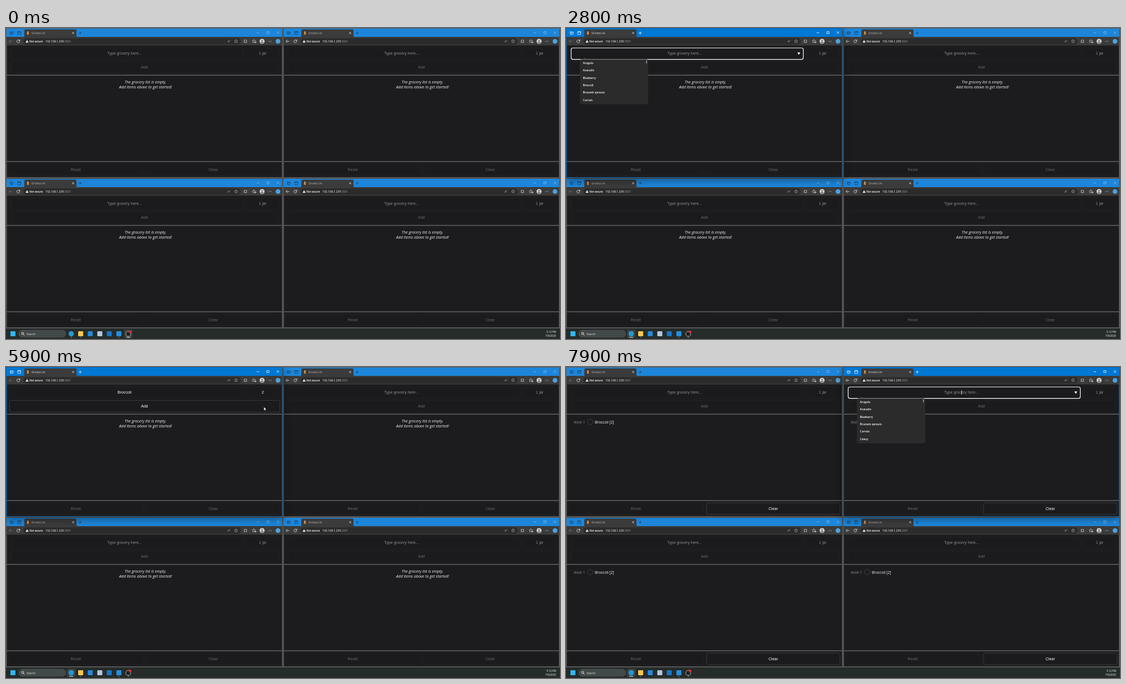
Write an HTML page that moves like this. It is 998 px wide and 561 px high and loops after 8 s.

```html
<!DOCTYPE html>
<html lang="en">
<head>
<meta charset="utf-8">
<title>Grocery List</title>
<style>
  html, body { margin: 0; width: 100%; height: 100%; overflow: hidden; background: #5c5c5c; }
  #stage { position: relative; width: 998px; height: 561px; overflow: hidden; }
  svg { display: block; position: absolute; left: 0; top: 0; }
  .window { position: absolute; width: 498px; height: 270px; box-shadow: 0 1px 5px rgba(0,0,0,.25); }
  .window.active { box-shadow: 0 4px 14px rgba(0,0,0,.42); }
  #overlay, #taskbar { z-index: 9; }
  text { white-space: pre; }
  .ui { font-family: "Open Sans", "Noto Sans", sans-serif; }
  .form { font: 7px "Liberation Sans", Arial, sans-serif; text-anchor: middle; }
  .line { fill: none; stroke-width: .8; stroke-linecap: round; stroke-linejoin: round; }
</style>
</head>
<body>
<div id="stage">
  <div class="window"></div>
  <div class="window"></div>
  <div class="window"></div>
  <div class="window"></div>
  <svg id="taskbar" width="998" height="561"></svg>
  <svg id="overlay" width="998" height="561"></svg>
</div>
<script>
const LOOP = 8000, STEP = 100;
const ORIGINS = [[0, 0], [499, 0], [0, 271], [499, 271]];
const ROW = 13.27;
const GROCERIES = ['Arugula', 'Avacado', 'Blueberry', 'Broccoli', 'Brussels sprouts', 'Carrots', 'Celery'];

const T = {
  activate: 1500, hover: 2000, focus: 2200, pick: 4500, quantity: 5300,
  typed: 5500, overAdd: 5700, added: 6200, blocked: 6500, hover2: 7400, focus2: 7700
};

// time, x, y
const POINTER = [
  [1000, 60, 235], [1400, 160, 175], [1700, 190.5, 153], [1800, 194, 138], [1900, 206, 84], [2000, 213, 46],
  [3500, 213, 46], [3600, 206, 60], [3800, 150, 78], [4100, 84, 97], [4300, 72.5, 101], [4500, 72.5, 101],
  [4600, 160, 74], [4700, 300, 50], [5000, 330, 46], [5100, 462, 46], [5600, 462, 46], [5700, 464, 62],
  [5900, 464.5, 72], [6200, 258, 72], [6800, 258, 72], [7200, 490.5, 72], [7300, 620, 60], [7400, 712, 46], [8000, 712, 46]
];

const between = (t, from, to) => t >= from && t < to;

function pointerAt(t) {
  if (t < POINTER[0][0]) return null;
  const i = POINTER.findIndex(p => p[0] > t);
  const [t0, x0, y0] = POINTER[i - 1], [t1, x1, y1] = POINTER[i];
  const k = (t - t0) / (t1 - t0);
  return { x: x0 + (x1 - x0) * k, y: y0 + (y1 - y0) * k };
}

const rect = (x, y, w, h, fill, r = 0, more = '') =>
  `<rect x="${x}" y="${y}" width="${w}" height="${h}" rx="${r}" fill="${fill}" ${more}/>`;
const circle = (x, y, r, fill, more = '') => `<circle cx="${x}" cy="${y}" r="${r}" fill="${fill}" ${more}/>`;
const line = (d, stroke, more = '') => `<path class="line" d="${d}" stroke="${stroke}" ${more}/>`;
const label = (x, y, size, fill, str, more = '') =>
  `<text class="ui" x="${x}" y="${y}" font-size="${size}" fill="${fill}" ${more}>${str}</text>`;
const formText = (x, y, fill, str) => `<text class="form" x="${x}" y="${y}" fill="${fill}">${str}</text>`;
const box = (x, y, w, h, stroke, width = .7) =>
  rect(x, y, w, h, '#1b1b1d', 3, `stroke="${stroke}" stroke-width="${width}"`);

function titleBar(active) {
  const ink = active ? '#fff' : 'rgba(255,255,255,.45)';
  const icon = active ? '#eaf4ff' : '#123f68';
  return rect(1, 1, 496.5, 17, active ? '#0078d4' : '#1d86da') +
    line('M8 7h4a1 1 0 0 1 1 1v1M7.5 7v3a1.5 1.5 0 0 0 1.5 1.5', icon) +
    circle(11, 9.8, 1.9, 'none', `stroke="${icon}" stroke-width=".8"`) +
    line('M21.5 6.5h5v5h-5zM21.5 7.3h5', icon) +
    `<path d="M30 17q3 0 3-3V5q0-2.500 2.500-2.500H124.500Q127 2.500 127 5V14q0 3 3 3z" fill="#3b3b3b"/>` +
    rect(37.8, 8, 3.4, 4, '#d9822b', .8) + circle(39.3, 7.2, 1.2, '#b9b9b9') +
    label(46, 10.7, 4.4, active ? '#eee' : '#c4c4c4', 'Grocery List') +
    line('M119.500 7.500l3 3m0-3l-3 3', '#ddd', 'stroke-width=".6"') +
    line('M131.500 9h4.400M133.700 6.800v4.400', active ? '#fff' : '#123f68') +
    line('M452 8.500h3.500M470.200 6.500h3.600v3.600h-3.600zM488 6.500l3.600 3.600m0-3.600l-3.600 3.600', ink);
}

function toolBar(canGoBack) {
  const ink = '#dedede';
  return rect(1, 16, 496.5, 18, '#3b3b3b') +
    line('M11 24H5.500m2.300-2.300L5.500 24l2.300 2.300', canGoBack ? ink : '#707070') +
    line('M24.700 23a2.700 2.700 0 1 0 .1 1.800M25 21v2.200h-2.200', ink) +
    rect(31.5, 18.3, 391.5, 11.4, '#2b2b2b', 5.7) +
    `<path d="M38 21.300l2.700 4.900h-5.400z" fill="#fff"/>` + line('M38 23v1.400', '#2b2b2b', 'style="stroke-width:.6"') +
    label(42.3, 25.7, 4.6, '#fff', 'Not secure', 'font-weight="600"') +
    label(71, 25.8, 5.1, '#fff', '192.168.1.239<tspan fill="#a5a5a5">:3001</tspan>') +
    label(399.3, 26, 5.2, '#bbb', 'A') + line('M403.500 21.500q1 1 0 2', '#bbb', 'style="stroke-width:.5"') +
    star(414.5, 24, '#bbb') +
    line('M429.500 22h1.300q.7-1.400 1.400 0h1.300v1.300q-1.400.700 0 1.400v1.300h-4z', ink) +
    star(446.5, 24, ink) + line('M448.500 25h2M448.500 26.500h2', ink) +
    circle(461.3, 24, 4.5, '#d6d6d6') + circle(461.3, 22.7, 1.5, '#777') +
    `<path d="M458.400 26.800q0-2 2.900-2t2.900 2q-2.900 2-5.800 0" fill="#777"/>` +
    [473.2, 475.4, 477.6].map(x => circle(x, 24, .6, ink)).join('') +
    circle(490, 24, 4.3, '#4f9fdc');
}

function star(cx, cy, stroke) {
  const points = Array.from({ length: 10 }, (_, i) => {
    const r = i % 2 ? 1.5 : 3.2, a = (i / 5 - .5) * Math.PI;
    return `${(cx + r * Math.cos(a)).toFixed(2)} ${(cy + r * Math.sin(a)).toFixed(2)}`;
  });
  return line(`M${points.join('L')}z`, stroke, 'style="stroke-width:.6"');
}

function dropDown({ names, opacity, hovered }) {
  const rows = names.map((name, i) =>
    (i === hovered ? rect(27, 57.3 + i * ROW, 116, ROW - 1, '#414141', 1.5) : '') +
    label(30.5, 65.2 + i * ROW, 4.95, '#fff', name, 'font-weight="600"')).join('');
  return `<g opacity="${opacity}"><path d="M31 56.500l3.300-2.300 3.300 2.300z" fill="#555"/>` +
    rect(25.5, 56.7, 122, 80.3, '#2b2b2b', 2, 'stroke="#383838" stroke-width=".5"') +
    rows + rect(144.2, 58, 1.5, 6, '#9a9a9a', .7) + '</g>';
}

function body(s) {
  const faint = '#252527', solid = '#48484b', dim = '#666', hint = '#8d8d8f';
  const frame = on => on ? '#fff' : faint;
  const caretX = s.focus === 'quantity' ? 462.5 : s.item ? 227 : 213.7;
  const grow = s.addHover ? 3 : 0;
  const list = s.listed
    ? `<g opacity="${s.listed}">` + label(14, 101.5, 6.75, '#8d8d8f', 'Aisle 1') +
      circle(43.7, 99, 4.9, 'none', 'stroke="#4a4a4d" stroke-width=".8"') +
      label(52, 101.5, 6.65, '#fff', 'Broccoli [2]') + '</g>'
    : ['The grocery list is empty.', 'Add items above to get started!'].map((str, i) =>
        label(251.3, 100 + i * 9.3, 7, '#eee', str, 'font-style="italic" text-anchor="middle"')).join('');
  return `<path d="M1.500 269V34q0-2.500 2.500-2.500H494.500q2.500 0 2.500 2.500V269z" fill="#1c1c1e"/>` +
    box(9.3, 36, 418.2, 20.6, frame(s.focus === 'item'), s.focus === 'item' ? 1.2 : .7) +
    formText(213.5, 48.4, s.item ? '#fff' : hint, s.item || 'Type grocery here...') +
    (s.arrow ? '<path d="M416.800 44h5.200l-2.600 4.600z" fill="#fff"/>' : '') +
    box(434.8, 36, 56, 20.6, frame(s.focus === 'quantity'), s.focus === 'quantity' ? 1.2 : .7) +
    formText(462.4, 48.4, s.quantity ? '#fff' : hint, s.quantity || '1 jar') +
    box(9.3 - grow, 60.4, 481 + grow * 2, 21.2, s.item ? solid : faint) +
    formText(249.5, 73, s.item ? '#fff' : dim, 'Add') +
    rect(1.5, 84.6, 495.5, 1, '#858585') + list +
    rect(1.5, 240.4, 495.5, 1, '#858585') +
    box(5.7, 245, 240.5, 20.8, faint) + formText(125.6, 257.5, dim, 'Reset') +
    box(253.2, 245, 240.5, 20.8, s.listed ? solid : faint) +
    formText(373.4, 257.5, s.listed ? '#fff' : dim, 'Clear') +
    (s.caret ? rect(caretX - .3, 42, .7, 8, '#fff') : '') +
    (s.menu ? dropDown(s.menu) : '');
}

function windowMarkup(i, s) {
  return '<svg width="498" height="270">' + rect(0, 0, 498, 270, s.active ? '#0b62a8' : '#5f5f5f') +
    titleBar(s.active) + toolBar(i % 2) + body(s) + '</svg>';
}

function windowState(i, t, pointer) {
  const s = { active: false, listed: t < T.added ? 0 : t < 6500 ? .55 : t < 6700 ? .8 : 1 };
  if (i === 0) {
    s.active = between(t, T.activate, T.focus2);
    s.arrow = between(t, T.hover, T.quantity);
    s.focus = between(t, T.focus, T.quantity) ? 'item' : between(t, T.quantity, T.overAdd) ? 'quantity' : null;
    s.item = between(t, T.pick, T.added) ? 'Broccoli' : '';
    s.quantity = between(t, T.typed, T.added) ? '2' : '';
    s.caret = between(t, 2300, 2800) || between(t, 3300, 3800) || between(t, T.pick, 5000) || between(t, T.quantity, T.typed);
    s.addHover = between(t, T.overAdd, T.added);
    if (between(t, 2300, T.pick)) s.menu = {
      names: GROCERIES.slice(0, 6),
      opacity: t < 2400 ? .6 : 1,
      hovered: pointer.y > 57 && pointer.x < 147 ? Math.floor((pointer.y - 57) / ROW) : -1
    };
  }
  if (i === 1) {
    s.active = t >= T.focus2;
    s.arrow = t >= T.hover2;
    s.focus = s.active ? 'item' : null;
    s.caret = t >= T.focus2;
    if (t >= 7800) s.menu = { names: GROCERIES.filter(g => g !== 'Broccoli'), opacity: t < 7900 ? .6 : 1, hovered: -1 };
  }
  return s;
}

function taskbarMarkup(t) {
  const browsing = t >= T.activate;
  const app = (x, fill) => rect(x - 4.5, 547, 9, 9, fill, 1);
  const dot = x => rect(x - 1.2, 557.6, 2.4, 1, '#9aa0a0', .5);
  const current = browsing ? 117.5 : 220.5;
  return rect(0, 542, 998, 19, '#252c2a') +
    rect(current - 7.5, 544, 15, 15, '#3a4241', 2) +
    app(12.5, '#35b5ee') +
    rect(22.8, 545, 85, 13, '#424a49', 6.5, 'stroke="#525a59" stroke-width=".5"') +
    circle(30, 551, 1.9, 'none', 'stroke="#fff" stroke-width=".8"') + line('M31.400 552.500l1.500 1.600', '#fff') +
    label(37, 553.5, 5.1, '#e0e0e0', 'Search') +
    circle(117.5, 551.5, 4.8, '#2498cf') + app(134.5, '#f5c752') + app(151.7, '#2389d8') +
    app(169, '#b7c6dc') + app(186, '#1775cc') + app(203.4, '#2491dc') +
    circle(220.3, 551.8, 4.5, '#222', 'stroke="#d0d0d0" stroke-width=".8"') + circle(223.6, 548.2, 2.4, '#e32b2b') +
    [117.5, 134.5, 203.4, 220.5].filter(x => x !== current).map(dot).join('') +
    rect(current - 3.5, 557.6, 7, 1.1, '#c9d4d8', .5) +
    label(991, 550, 4.6, '#fff', '5:12 PM', 'text-anchor="end"') +
    label(991, 556.7, 4.6, '#fff', '7/6/2025', 'text-anchor="end"');
}

function pointerMarkup(t, p) {
  // The text cursor is invisible over the input row.
  if (!p || between(p.y, 35, 57)) return '';
  if (t >= T.blocked) return circle(p.x, p.y, 2.6, '#fff', 'stroke="#c8141e" stroke-width="1.2"') +
    line(`M${p.x - 1.7} ${p.y - 1.7}l3.400 3.400`, '#c8141e', 'style="stroke-width:1.1"');
  return `<path transform="translate(${p.x} ${p.y})" d="M0 0V6.300L1.500 5 2.500 7.300 3.600 6.800 2.600 4.600H4.600z" ` +
    'fill="#fff" stroke="#000" stroke-width=".4"/>';
}

const windows = [...document.querySelectorAll('.window')];
const taskbar = document.getElementById('taskbar');
const overlay = document.getElementById('overlay');
const drawn = new Map();

windows.forEach((el, i) => {
  [el.style.left, el.style.top] = ORIGINS[i].map(v => v + 'px');
});

function update(el, markup) {
  if (drawn.get(el) === markup) return;
  drawn.set(el, markup);
  el.innerHTML = markup;
}

function render(t) {
  const pointer = pointerAt(t);
  windows.forEach((el, i) => {
    const s = windowState(i, t, pointer);
    el.classList.toggle('active', s.active);
    el.style.zIndex = s.active ? 3 : i === 0 ? 2 : 1;
    update(el, windowMarkup(i, s));
  });
  update(taskbar, taskbarMarkup(t));
  update(overlay, pointerMarkup(t, pointer));
}

const start = performance.now();
function tick() {
  const t = (performance.now() - start) % LOOP;
  render(Math.floor(t / STEP) * STEP);
  requestAnimationFrame(tick);
}
tick();
</script>
</body>
</html>
```
